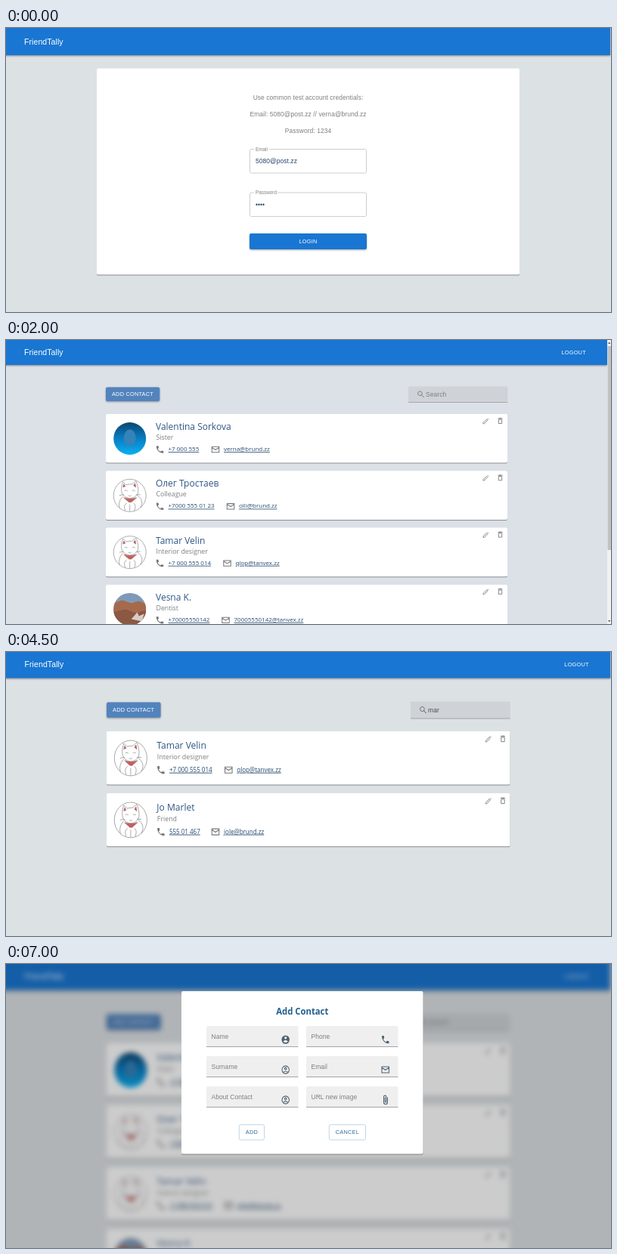
Write an HTML page that moves like this. It is 800x376 px and loops after 8 s.

```html
<!DOCTYPE html>
<html lang="en">
<head>
<meta charset="utf-8">
<title>FriendTally</title>
<style>
  html, body { margin: 0; width: 100%; height: 100%; overflow: hidden; }
  svg { display: block; }
  #stage { width: 800px; height: 376px; }
  text { font-family: "Liberation Sans", Arial, sans-serif; font-size: 8.45px; letter-spacing: .009em; fill: #7d7f82; }
  .logo { font-size: 10.5px; letter-spacing: .0075em; fill: #fff; }
  .btn { font-size: 7.37px; letter-spacing: .0286em; }
  .white { fill: #fff; }
  .action { fill: #2f6f9f; }
  .mid { text-anchor: middle; }
  .tiny { font-size: 6.3px; }
  .typed { fill: #24466b; }
  .query { fill: #4a4d50; }
  .name, .role, .link, .title { font-family: "Open Sans", "Noto Sans", sans-serif; letter-spacing: 0; }
  .name { font-size: 12px; fill: #2f5685; }
  .role { font-size: 8.8px; }
  .link { font-size: 8px; fill: #25496f; text-decoration: underline; }
  .title { font-size: 11.3px; font-weight: 700; fill: #22608f; }
  .line { fill: none; stroke: currentColor; stroke-width: 2; }
  .bar { fill: #1976d2; filter: drop-shadow(0 1.4px 1.2px rgba(0, 0, 0, .42)); }
  .paper { fill: #fff; filter: drop-shadow(0 1px .7px rgba(0, 0, 0, .36)); }
  .raised { filter: drop-shadow(0 1px .8px rgba(0, 0, 0, .35)); }
  .blur { filter: blur(3.6px); }

  .scene { visibility: hidden; animation: 8s step-end infinite; }
  #login { animation-name: login; }
  #all { animation-name: all; }
  #found { animation-name: found; }
  #add { animation-name: add; }
  @keyframes login { 0% { visibility: visible } 6.25%, 100% { visibility: hidden } }
  @keyframes all { 0% { visibility: hidden } 6.25% { visibility: visible } 37.5%, 100% { visibility: hidden } }
  @keyframes found { 0% { visibility: hidden } 37.5% { visibility: visible } 68.75%, 100% { visibility: hidden } }
  @keyframes add { 0% { visibility: hidden } 68.75%, 100% { visibility: visible } }
</style>
</head>
<body>
<svg id="stage" viewBox="0 0 800 376">
  <defs>
    <linearGradient id="sea" x2="0" y2="1">
      <stop offset="0" stop-color="#0b466e"/><stop offset=".45" stop-color="#0a78bd"/><stop offset="1" stop-color="#0bb0f2"/>
    </linearGradient>
    <clipPath id="round"><circle r="21.5"/></clipPath>

    <symbol id="phone" viewBox="0 0 24 24"><path fill="currentColor" d="M6.6 10.8c1.4 2.8 3.8 5.1 6.6 6.6l2.2-2.2c.3-.3.7-.4 1-.2 1.1.4 2.3.5 3.6.5.6 0 1 .5 1 1V20c0 .6-.5 1-1 1C10.6 21 3 13.4 3 4c0-.6.5-1 1-1h3.5c.6 0 1 .5 1 1 0 1.3.2 2.5.6 3.6.1.3 0 .7-.3 1z"/></symbol>
    <symbol id="edit" viewBox="0 0 24 24"><path class="line" d="M4 20V17L14.5 6.500 17.500 9.500 7 20ZM17 4L20 7"/></symbol>
    <symbol id="mail" viewBox="0 0 24 24"><path class="line" d="M3 5H21V19H3ZM3 7L12 12.5 21 7"/></symbol>
    <symbol id="trash" viewBox="0 0 24 24"><path class="line" d="M5 5H19M9 4H15M7 8V20H17V8Z"/></symbol>
    <symbol id="search" viewBox="0 0 24 24"><path class="line" d="M9.5 4a5.5 5.5 0 1 0 .01 0M14 14L20 20"/></symbol>
    <symbol id="person" viewBox="0 0 24 24"><path class="line" d="M12 3a9 9 0 1 0 .01 0M12 7a2.5 2.5 0 1 0 .01 0M6 18Q12 13 18 18"/></symbol>
    <symbol id="personFull" viewBox="0 0 24 24"><circle cx="12" cy="12" r="10" fill="currentColor"/><circle cx="12" cy="8" r="3" fill="#efefef"/><path fill="#efefef" d="M6 16Q12 10 18 16Q12 22 6 16"/></symbol>
    <symbol id="clip" viewBox="0 0 24 24"><path class="line" d="M17.2 6V17.5a4.7 4.7 0 0 1-9.4 0V5a3.2 3.2 0 0 1 6.4 0V15.5a1.7 1.7 0 0 1-3.4 0V6"/></symbol>

    <g id="cat" fill="none" stroke="#6a6b6f" stroke-width=".55">
      <circle r="21.5" fill="#fff"/>
      <path d="M-10-2C-12-8-11-13-9-18L-5-14Q-1-15 3-15L8-19C11-13 12-6 10-1Q6 4 0 4T-10-2Z"/>
      <path d="M-9 1C-15 7-15 14-13 17M10 0C16 4 18 10 14 16M-6 20Q-9 13-4 10M6 20Q9 13 5 10M0 12V21"/>
      <path d="M-7-6q2-2 4 0M3-6q2-2 4 0M-2 0Q0 2 2 0M-8-1L-14 0M8-1L14-1"/>
      <path d="M-8-15L-6-12-9-11ZM7-16L8-11 5-13ZM-8 3Q0 6 9 3L2 9-1 9Z" fill="#c4605e" stroke="#a94b4b"/>
    </g>
    <g id="blue">
      <circle r="21.5" fill="url(#sea)"/>
      <ellipse cy="-1" rx="8" ry="11" fill="#3583ba"/>
    </g>
    <g id="hills" clip-path="url(#round)">
      <path fill="#7f9ab8" d="M-22-22H22V22H-22Z"/>
      <path fill="#a5694b" d="M-22-8L-10-12 2-8 12-11 22-7V22H-22Z"/>
      <path fill="#8a5843" d="M-22 4L-6 0 8 5 22 1V22H-22Z"/>
      <path fill="#d9cdc6" d="M2 13L10 4 12 9 19 6 16 16Z"/>
    </g>
  </defs>
</svg>
<script>
  const stretch = 1.088;
  // avatar, name, role, phone, mail, x of the mail text
  const people = {
    valentina: ['blue', 'Valentina Sorkova', 'Sister', '+7 000 555', 'verna@brund.zz', 288],
    oleg: ['cat', 'Олег Тростаев', 'Colleague', '+7000 555 01 23', 'olli@brund.zz', 308],
    tamar: ['cat', 'Tamar Velin', 'Interior designer', '+7 000 555 014', 'qlop@tanvex.zz', 303.5],
    vesna: ['hills', 'Vesna K.', 'Dentist', '+70005550142', '70005550142@tanvex.zz', 301.5],
    jo: ['cat', 'Jo Marlet', 'Friend', '555 01 467', 'jole@brund.zz', 286.3]
  };
  const everyone = [people.valentina, people.oleg, people.tamar, people.vesna];
  const matches = [people.tamar, people.jo];

  const text = (x, y, str, cls = '') => `<text x="${x}" y="${y}" class="${cls}">${str}</text>`;
  const rect = (x, y, w, h, attrs = '') => `<rect x="${x}" y="${y}" width="${w}" height="${h}" ${attrs}/>`;
  const icon = (id, cx, cy, size = 12.6, color = '#74777b') =>
    `<use href="#${id}" x="${cx - size / 2}" y="${cy - size / 2}" width="${size}" height="${size}" color="${color}"/>`;
  const scene = (id, body) => `<g id="${id}" class="scene">${body}</g>`;
  const backdrop = color => rect(-20, -20, 840, 416, `fill="${color}"`);
  const header = right => rect(-20, -20, right + 20, 53, 'class="bar"') + text(24, 20.2, 'FriendTally', 'logo');

  function card([avatar, name, role, phone, mail, mailX], i) {
    return `<g transform="translate(0 ${i * 75.3})">` +
      rect(132, 98, 531, 64.6, 'rx="2" class="paper"') +
      `<use href="#${avatar}" x="163.7" y="130.5"/>` +
      text(198, 119, name, 'name') + text(198.5, 132, role, 'role') +
      icon('phone', 203.5, 145) + text(214.5, 147.2, phone, 'link') +
      icon('mail', mailX - 11, 145) + text(mailX, 147.2, mail, 'link') +
      icon('edit', 634.5, 107.3, 10.5) + icon('trash', 653.5, 107, 10.5) + '</g>';
  }

  function list(cards, query) {
    return header(795) + text(734.5, 19, 'LOGOUT', 'btn white') +
      rect(132, 62.5, 71.2, 18.5, 'rx="2" fill="#5283bd" class="raised"') +
      text(140, 74.3, 'ADD CONTACT', 'btn white') +
      rect(532, 61.5, 131.3, 21, 'rx="1.5" fill="#cfd3d7"') +
      rect(532, 82, 131.3, .6, 'fill="#858a90"') +
      icon('search', 548.7, 72, 12) +
      text(555, 74.8, query || 'Search', query && 'query') +
      cards.map(card).join('');
  }

  const wide = body => `<g transform="matrix(1.0047 0 0 ${stretch} .4 -1.5)">${body}</g>`;
  const tall = body => `<g transform="scale(1 ${stretch})">${body}</g>`;

  const outlined = (y, label, gap, value) =>
    rect(322.5, y, 154, 29, 'rx="2" fill="none" stroke="#c4c4c4" stroke-width=".8"') +
    rect(328, y - 1, gap, 2, 'fill="#fff"') +
    text(330, y + 2.1, label, 'tiny') + text(330, y + 17.2, value, 'typed');

  const login = backdrop('#dce1e4') + tall(
    header(799) +
    rect(120, 49.2, 559, 251, 'rx="2" class="paper"') +
    text(399.5, 87.3, 'Use common test account credentials:', 'mid') +
    text(399.5, 107.5, 'Email: 5080@post.zz // verna@brund.zz', 'mid') +
    text(399.5, 127.8, 'Password: 1234', 'mid') +
    outlined(147.5, 'Email', 20, '5080@post.zz') +
    outlined(200.3, 'Password', 31, '••••') +
    rect(322, 250, 155, 19.2, 'rx="2" fill="#1976d2" class="raised"') +
    text(399.5, 262.4, 'LOGIN', 'btn white mid'));

  const scrollbar = rect(795, 0, 5, 376, 'fill="#f1f1f1"') +
    rect(795.5, 8, 4.5, 270, 'fill="#c1c1c1"') +
    '<path fill="#606060" d="M796 5L797.7 2.5 799.4 5ZM796 371L797.7 373.5 799.4 371Z"/>';

  const fields = [['Name', 'personFull'], ['Phone', 'phone'], ['Surname', 'person'],
    ['Email', 'mail'], ['About Contact', 'person'], ['URL new image', 'clip']];

  function field([label, id], i) {
    const x = 265 + i % 2 * 132, y = 75.4 + (i >> 1) * 36.7;
    return rect(x, y, 121.5, 25.5, 'rx="2" fill="#efefef"') +
      rect(x, y + 24.9, 121.5, .7, 'fill="#8b8b8b"') +
      text(x + 6.5, y + 15.6, label) + icon(id, x + 104.7, y + 16.6, 12.6, '#4f6272');
  }

  const outlineButton = (x, w, label) =>
    rect(x, 195.5, w, 18.6, 'rx="2" fill="#fff" stroke="#a9c6e0" stroke-width=".7"') +
    text(x + w / 2, 207.2, label, 'btn mid action');

  const dialog = tall(
    rect(232, 33.1, 319.5, 198, 'rx="2" class="paper"') +
    text(391.8, 62, 'Add Contact', 'title mid') +
    fields.map(field).join('') +
    outlineButton(308.3, 33.2, 'ADD') + outlineButton(427.3, 48.2, 'CANCEL'));

  document.getElementById('stage').insertAdjacentHTML('beforeend',
    scene('login', login) +
    scene('all', backdrop('#dce0e7') + list(everyone) + scrollbar) +
    scene('found', backdrop('#dce1e4') + wide(list(matches, 'mar'))) +
    scene('add', `<g class="blur">${backdrop('#dce1e4')}${wide(list(everyone))}</g>` +
      rect(0, 0, 800, 376, 'fill-opacity=".2"') + dialog));
</script>
</body>
</html>
```
